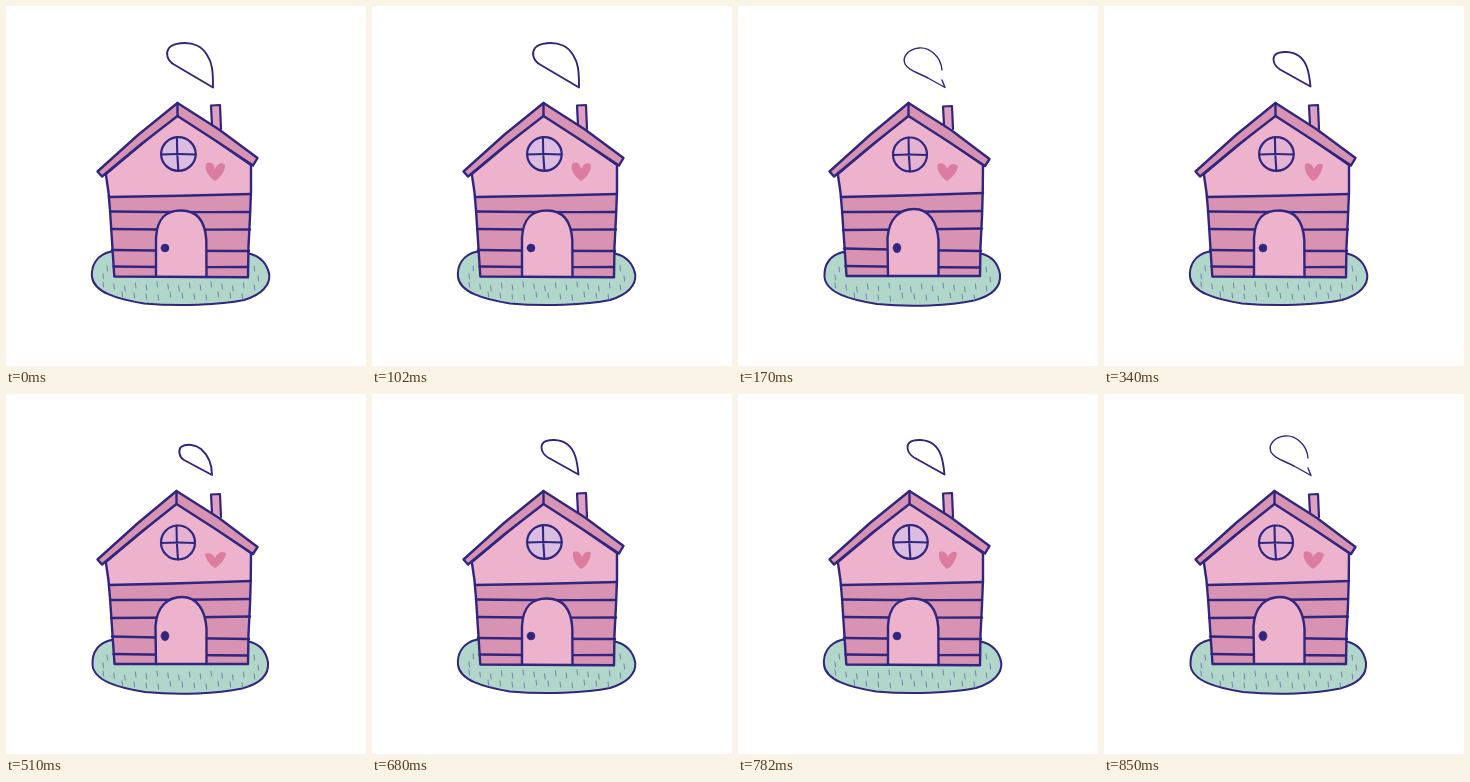
Recreate the animation shown at these times as an HTML page with a canvas. Size 360x360 px, loop 1020 ms.

```html
<!DOCTYPE html>
<html lang="en">
<head>
<meta charset="utf-8">
<style>
html, body { margin: 0; width: 100%; height: 100%; overflow: hidden; background: #fff; }
canvas { display: block; width: 360px; height: 360px; }
</style>
</head>
<body>
<canvas id="stage" width="360" height="360"></canvas>
<script>
const ctx = document.getElementById('stage').getContext('2d');
const STEP = 170, INK = '#30257f', LIGHT = '#edb3cc', MID = '#e0a0c0', DARK = '#d793b1';

// Two alternating drawings give the hand-drawn wobble.
const poses = [
  {
    grass: 'M105 245.500C90 249 85 260 86 271C88 286 110 293 138 297.500C172 300.500 214 299 238 294C256 288.500 264 279 263.300 269C261 256 253 250 243 247.500Z',
    wall: 'M171.500 108L99.800 168Q103 186 104 204L108.300 270.500L242 271.300Q242 240 244 211Q245.500 186 245 159Z',
    roof: 'M171.500 97L132 129L91.500 165.500L96 170.500L134 139L171.500 110L211 135.500L247 159.500L251.500 152L213 123.500Z',
    ridge: 'M171.500 97V110',
    chimney: 'M206 119L205 99.500L214 99L215 123',
    door: 'M150 270L150 232C151 212 160 204.500 175 204.500C191 204.500 199 214 200.300 234L200.500 271',
    boards: [[103, 191, 245, 188], [104, 205.500, 244, 206], [105, 223, 244, 223.500], [106, 244, 243, 245], [107.500, 260.500, 242, 261]],
    window: [172.4, 148, 17.3, 16.8], knob: [159, 242, 4, 4], tick: 0
  },
  {
    grass: 'M105 246C90 250 86 260 86.500 271C88 287 112 293.500 139 298C174 301.500 212 299.500 236 294.500C255 289.500 263 280 262 268.500C260 256 253 250 243 247.500Z',
    wall: 'M171 108L99.800 168Q103 186 104 204L108.500 270L242 270Q242 240 244 211Q245 186 245 159Z',
    roof: 'M170.500 97L132 129L91.500 165.500L96 170.500L134 139L170.500 110L211 136L247 160L251.500 153L213 124Z',
    ridge: 'M170.500 97V110',
    chimney: 'M206 119L205 100.500L214 100L215 123',
    door: 'M150 270L149.500 232C151 212 162 203 176 203C191 203 199 216 200.500 234L200.500 270',
    boards: [[103, 191, 245, 187], [104, 206, 244, 205], [105, 224, 244, 222.500], [106, 242.500, 243, 245], [107.500, 260, 242, 261.500]],
    window: [172, 148.500, 17, 17], knob: [159, 242, 4, 4.8], tick: 1
  }
];

const smoke = [
  'M207 81.500L168 58.500C160 54 160 46 163 42C167 37 181 35 191 39.500C199 43 205 54 206 62C207 68 207 75 207 81Z',
  'M204 64C203 51 192 41 181 42C170 43 164 51 167 58C170 64 178 66 190 72L207 81.500L204 74',
  'M206.500 80.500L176 63.500C169 59 168 52 171.500 48.500C176 45 188 45 195 50C203 56 205 66 206.500 80.500Z',
  'M206 81L178 66C173 63 172 56 175 53C181 49 190 51 195 55C203 62 206 71 206 81Z'
];

const hearts = [
  'M209 175C203 171 198 164 200 158C204 155 208 157 209 163C212 157 216 156 219 159C219 166 214 172 209 175Z',
  'M209 175C203 171 198 164 200 158C204 156 208 158 209 163C212 157 216 157 220 160C219 166 214 172 209 175Z',
  'M209 175C204 171 200 165 201 158C205 156 208 158 210 163C213 157 216 157 219 159C218 166 214 173 209 175Z',
  'M209 174C204 171 200 166 199 160C203 158 207 160 209 164C212 158 216 157 220 159C219 166 214 171 209 174Z'
];

function draw(path, fill, width = 2.4, stroke = INK) {
  const p = new Path2D(path);
  if (fill) { ctx.fillStyle = fill; ctx.fill(p); }
  if (width) { ctx.lineWidth = width; ctx.strokeStyle = stroke; ctx.stroke(p); }
}

function oval([x, y, rx, ry], fill, width) {
  draw(`M${x - rx} ${y}a${rx} ${ry} 0 1 0 ${2 * rx} 0a${rx} ${ry} 0 1 0 ${-2 * rx} 0Z`, fill, width);
}

function drawGrass(pose) {
  draw(pose.grass, '#b0d7ca', 2);
  let ticks = '';
  const tick = (x, y) => ticks += `M${x} ${y + pose.tick}l0.6 5`;
  for (let i = 0; i < 15; i++) tick(97 + i * 10.8, 276 + i * 7 % 5);
  for (let i = 0; i < 11; i++) tick(116 + i * 12, 286 + i * 5 % 4);
  [[101, 260], [97, 268], [248, 260], [252, 270]].forEach(([x, y]) => tick(x, y));
  draw(ticks, null, 1, '#7780ad');
}

function drawHouse(pose, heart, pane) {
  const [[x1, y1, x2, y2]] = pose.boards;
  draw(pose.chimney, MID, 2.2);
  draw(pose.wall, LIGHT, 0);
  ctx.save();
  ctx.clip(new Path2D(pose.wall));
  draw(`M${x1 - 9} ${y1}L${x2 + 9} ${y2}V280H90Z`, DARK, 0);
  ctx.restore();
  pose.boards.forEach(([x1, y1, x2, y2]) =>
    draw(`M${x1} ${y1}Q${(x1 + x2) / 2} ${(y1 + y2) / 2 + 0.6} ${x2} ${y2}`));
  draw(pose.door, LIGHT);
  draw(pose.wall);
  oval(pose.knob, INK, 0.4);
  draw(pose.roof, DARK);
  draw(pose.ridge);
  const [x, y, rx, ry] = pose.window;
  oval(pose.window, pane, 2.2);
  draw(`M${x - 1.5} ${y - ry}Q${x - 1.5} ${y} ${x} ${y + ry}M${x - rx} ${y + 0.5}Q${x} ${y - 0.5} ${x + rx} ${y + 0.5}`, null, 2.1);
  draw(heart, '#dc7da0', 0);
}

function frame(now) {
  const step = Math.floor(now / STEP) % 6;
  const puff = Math.min(step, 6 - step);
  const pose = poses[step % 2];
  ctx.fillStyle = '#fff';
  ctx.fillRect(0, 0, 360, 360);
  ctx.lineCap = ctx.lineJoin = 'round';
  drawGrass(pose);
  drawHouse(pose, hearts[puff], step % 4 ? '#e6b2d1' : '#dabde1');
  draw(smoke[puff], null, puff === 1 ? 1.4 : 1.9);
  requestAnimationFrame(() => frame(performance.now()));
}
frame(performance.now());
</script>
</body>
</html>
```
